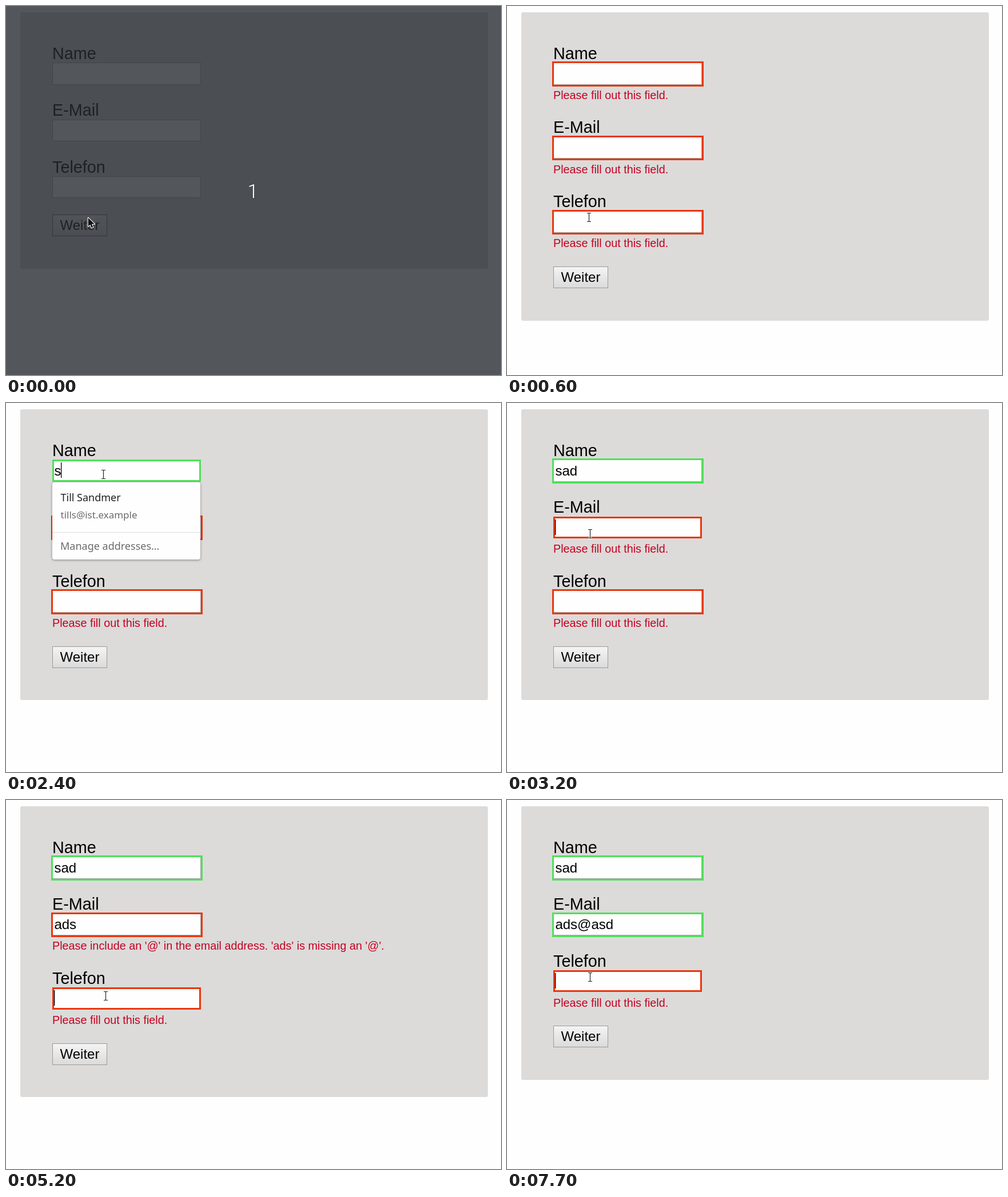
These frames come from a looping animation (866x646 px, 8 s). An HTML page with a canvas:

```html
<!DOCTYPE html>
<html lang="de">
<head>
<meta charset="utf-8">
<title>Formularprüfung</title>
<style>
html, body { margin: 0; width: 100%; height: 100%; overflow: hidden; background: #fefefe; }
canvas { display: block; }
</style>
</head>
<body>
<canvas id="stage" width="866" height="646"></canvas>
<script>
const ctx = document.getElementById('stage').getContext('2d');
const LOOP = 8000, STEP = 100, KEY_TIME = 100, BLINK = 600;
const SUBMIT = 500, RECHECK = 5200;
const ARIAL = '"Liberation Sans", Arial, sans-serif';
const NOTO = '"Noto Sans", sans-serif';
const PAGE = '#fefefe', RED = '#ea360d', GREEN = '#50e05a', ERROR = '#c60020';
const LEFT = 81, WIDTH = 260, FIRST_TOP = 99.4, ROW = 99.4, ERROR_HEIGHT = 30.2;
const REQUIRED = 'Please fill out this field.';
const NO_AT = "Please include an '@' in the email address. 'ads' is missing an '@'.";

const fields = [
  { label: 'Name', isValid: value => value !== '' },
  { label: 'E-Mail', isValid: value => /.@./.test(value) },
  { label: 'Telefon', isValid: value => value !== '' }
];
const typing = [
  { field: 0, at: 2400, keys: 'sad' },
  { field: 1, at: 3700, keys: 'ads' },
  { field: 1, at: 6500, keys: '@' },
  { field: 1, at: 6900, keys: 'asd' }
];
// Pointer moves; one that names a field ends with a click into it.
const moves = [
  { from: 900, to: 1800, x: 170, y: 125, field: 0 },
  { from: 2600, to: 3200, x: 145, y: 229, field: 1 },
  { from: 4100, to: 4700, x: 155, y: 276 },
  { from: 5000, to: 5100, x: 174, y: 343, field: 2 },
  { from: 5500, to: 6100, x: 160, y: 217, field: 1 },
  { from: 7200, to: 7700, x: 145, y: 310, field: 2 }
];
const arrow = new Path2D('M.8 .8v15l3.5-3 2.5 5.5 2.5-1.1-2.3-5.4h4.8z');

function text(str, x, y, size, color, family = ARIAL, weight = 400) {
  ctx.font = `${weight} ${size}px ${family}`;
  ctx.fillStyle = color;
  ctx.fillText(str, x, Math.round(y));
}

function centered(...args) {
  ctx.textAlign = 'center';
  text(...args);
  ctx.textAlign = 'left';
}

function box(x, y, w, h, fill, radius = 0) {
  ctx.fillStyle = fill;
  ctx.beginPath();
  ctx.roundRect(x, y, w, h, radius);
  ctx.fill();
}

// Border whose outer edge lies on the given box.
function border(x, y, w, h, color, line = 1) {
  ctx.strokeStyle = color;
  ctx.lineWidth = line;
  ctx.strokeRect(x + line / 2, y + line / 2, w - line, h - line);
}

function pointerAt(t) {
  let x = 143, y = 370;
  for (const move of moves) {
    const u = Math.min(1, Math.max(0, (t - move.from) / (move.to - move.from)));
    const eased = Math.sin(u * Math.PI / 2);
    x += (move.x - x) * eased;
    y += (move.y - y) * eased;
  }
  return [Math.round(x), Math.round(y)];
}

function valueAt(index, t) {
  return typing.filter(burst => burst.field === index && burst.at <= t)
    .map(burst => burst.keys.slice(0, 1 + Math.floor((t - burst.at) / KEY_TIME)))
    .join('');
}

function caretVisible(click, t) {
  const starts = typing.map(burst => burst.at).filter(at => at <= t);
  return (t - Math.max(click.to, ...starts)) % (2 * BLINK) < BLINK;
}

function drawArrow(x, y) {
  ctx.save();
  ctx.translate(x, y);
  ctx.lineJoin = 'round';
  ctx.lineWidth = 2.2;
  ctx.strokeStyle = '#fff';
  ctx.stroke(arrow);
  ctx.fillStyle = '#111';
  ctx.fill(arrow);
  ctx.restore();
}

function drawIBeam(x, y) {
  const shape = new Path2D(`M${x + 0.5} ${y - 7}v14m-3.5 .5h7m-7-15h7`);
  for (const [color, line] of [['#fff', 3], ['#222', 1.2]]) {
    ctx.strokeStyle = color;
    ctx.lineWidth = line;
    ctx.stroke(shape);
  }
}

function drawField({ label, top, value, valid, message }, checked, focused, caret) {
  const y = Math.round(top), h = Math.round(top + 38.2) - y;
  text(label, LEFT, top - 6.6, 28.8, '#000');
  box(LEFT, y, WIDTH, h, PAGE);
  border(LEFT, y, WIDTH, h, '#a6a6a6');

  const color = valid ? GREEN : RED;
  if (focused) border(LEFT, y, WIDTH, h, color, 3);
  else if (checked) border(LEFT - 2, y - 2, WIDTH + 5, h + 5, color, 3);

  text(value, 84.4, top + 27.6, 24, '#000');
  if (caret) box(Math.floor(84.6 + ctx.measureText(value).width), y + 5, 1.3, 27, '#000');
  if (message) text(message, LEFT, top + 63.6, 19.8, ERROR);
}

function drawButton(top, hovered) {
  const y = Math.round(top);
  const shade = ctx.createLinearGradient(0, y, 0, y + 38);
  shade.addColorStop(0, '#f5f5f5');
  shade.addColorStop(1, '#dadada');
  box(LEFT, y, 96, 38, shade, 1);
  border(LEFT, y, 96, 38, hovered ? '#686868' : '#999');
  centered('Weiter', 129, y + 27, 24, '#000');
}

function drawSuggestions() {
  ctx.save();
  ctx.shadowColor = 'rgba(0,0,0,.4)';
  ctx.shadowBlur = 4;
  ctx.shadowOffsetY = 1;
  box(LEFT, 139, 259, 135, PAGE, 4);
  ctx.restore();
  text('Till Sandmer', 95.5, 172, 18, '#202124', NOTO);
  text('tills@ist.example', 95.5, 202, 17, '#6a6b6d', NOTO);
  box(LEFT, 226, 259, 1, '#dedede');
  text('Manage addresses…', 95, 257, 18, '#6a6b6d', NOTO);
}

function drawCountdown() {
  box(0, 0, 866, 646, 'rgba(37,41,46,.79)');
  centered('1', 432, 336, 33, '#fff', 'Roboto, sans-serif', 300);
}

function draw(t) {
  const checked = t >= SUBMIT;
  const click = moves.filter(move => 'field' in move && move.to <= t).pop();
  const [px, py] = pointerAt(t);
  let extra = 0, overText = false;

  const rows = fields.map(({ label, isValid }, i) => {
    const top = FIRST_TOP + ROW * i + extra;
    const value = valueAt(i, t), valid = isValid(value);
    const wrong = checked && !valid;
    const message = wrong && (value && t >= RECHECK ? NO_AT : REQUIRED);
    const below = py - top;
    overText ||= below >= 0 && below <= 38 || wrong && below > 45 && below < 70;
    if (wrong) extra += ERROR_HEIGHT;
    return { label, top, value, valid, message };
  });

  box(0, 0, 866, 646, PAGE);
  box(25, 11, 818, Math.round(449 + extra), '#dcdbda', 3);
  rows.forEach((row, i) => {
    const focused = click?.field === i;
    drawField(row, checked, focused, focused && caretVisible(click, t));
  });
  drawButton(365.2 + extra, !checked);
  if (click?.field === 0 && t > click.to && rows[0].value.length < 2) drawSuggestions();
  if (t < STEP) drawCountdown();
  (overText ? drawIBeam : drawArrow)(px, py);
}

function tick() {
  const t = performance.now() % LOOP;
  draw(Math.floor(t / STEP) * STEP);
  requestAnimationFrame(tick);
}
tick();
</script>
</body>
</html>
```
